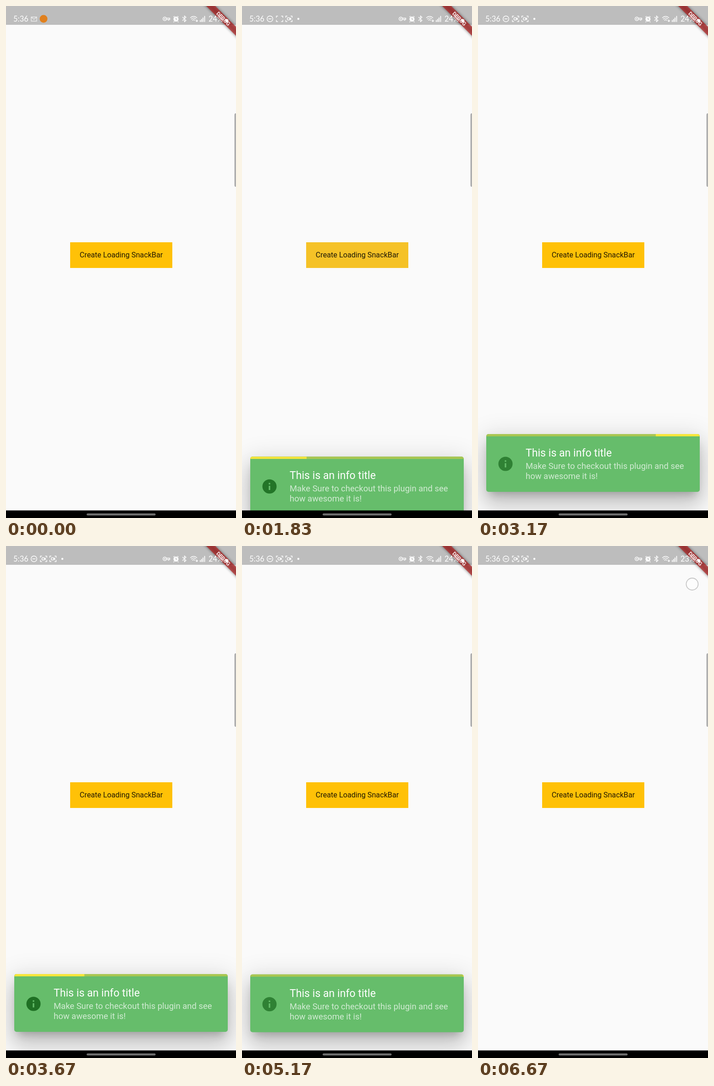
Animation, 502 px wide and 1116 px high, one loop 7.16 s. Source, as an HTML page:

```html
<!DOCTYPE html>
<html lang="en">
<head>
<meta charset="utf-8">
<title>Loading snackbar</title>
<style>
html, body { margin: 0; width: 100%; height: 100%; overflow: hidden; background: #fafafa; }
body { position: relative; font-family: Roboto, sans-serif; }
body > *, #bar > * { position: absolute; }
svg { left: 0; top: 0; }
#button { left: 140px; top: 515px; width: 223px; height: 55.5px; background: #ffc107; overflow: hidden; }
#button * { position: absolute; }
#label { left: 0; width: 100%; text-align: center; font-size: 16.2px; line-height: 56px; color: rgba(0,0,0,.87); }
#shade { inset: 0; background: #bcbcbc; }
#ripple { border-radius: 50%; background: #c8c8c8; transform: translate(-50%, -50%); left: 111px; top: 27px; }
#bar { left: 18px; top: 933px; width: 466px; height: 125.5px; border-radius: 5px; background: #66bd6b;
  box-shadow: 0 13px 17px -8px rgba(0,0,0,.2), 0 28px 44px 3px rgba(0,0,0,.14), 0 10px 53px 9px rgba(0,0,0,.12); }
#track { left: 0; top: 0; width: 466px; height: 4.6px; background: #a9c651; border-radius: 5px 5px 0 0; overflow: hidden; }
#track i { position: absolute; top: 0; height: 100%; background: #f7e63b; }
#title { left: 86px; top: 28px; font-size: 23.1px; line-height: 27px; color: #fff; white-space: nowrap; }
#message { left: 86px; top: 59px; font-size: 18.45px; line-height: 22px; color: rgba(255,255,255,.7); white-space: nowrap; }
</style>
</head>
<body>
<div id="button">
  <div id="shade"></div><div id="ripple"></div>
  <div id="label">Create Loading SnackBar</div>
</div>

<div id="bar">
  <div id="track"><i id="line1"></i><i id="line2"></i></div>
  <svg id="info" width="84" height="125">
    <path fill="#1f7024" fill-rule="evenodd" d="M26.5 65a15.5 15.5 0 1 0 31 0a15.5 15.5 0 1 0 -31 0M40.4 57.2h3.2v3.2h-3.2zM40.4 63.4h3.2v9.4h-3.2z"/>
  </svg>
  <div id="title">This is an info title</div>
  <div id="message">Make Sure to checkout this plugin and see<br>how awesome it is!</div>
</div>

<svg width="502" height="1116" fill="none" stroke-linecap="round" stroke-linejoin="round">
  <defs>
    <filter id="blur" x="-20%" y="-60%" width="140%" height="220%"><feGaussianBlur stdDeviation="3"/></filter>
    <path id="corners" d="M-7 -3V-6H-4M4 -6H7V-3M7 3V6H4M-4 6H-7V3"/>
    <g id="camera"><rect x="-3.5" y="-2.5" width="5" height="5" rx="1"/><path d="M1.5 0L4 -2V2Z"/></g>
  </defs>
  <path fill="#bdbdbd" d="M0 0H502V41H0Z"/>
  <path fill="#b0b0b0" d="M502 234h-1q-2.500 0 -2.500 4v152q0 4 2.500 4h1z"/>

  <g transform="translate(502 0) rotate(45)">
    <rect x="-60" y="32" width="120" height="14" fill="#000" opacity=".5" filter="url(#blur)"/>
    <rect x="-60" y="32" width="120" height="14" fill="#b71c1c" fill-opacity=".66"/>
    <text y="43.200" text-anchor="middle" font-size="11.800" font-weight="900" fill="#f3dede">DEBUG</text>
  </g>

  <g stroke="#fff" stroke-width="1.400">
    <g fill="#fff" stroke="none" font-family="Lato, 'Open Sans', sans-serif" font-size="16.500">
      <text x="16" y="34">5:36</text>
      <text id="battery" x="442" y="34">24%</text>
      <circle cx="482" cy="32" r="3.500"/>
    </g>
    <g id="early">
      <path d="M55 24H67V33H55ZM55 24L61 29L67 24" opacity=".7"/>
      <circle cx="82" cy="28" r="8.500" fill="#e0801e" stroke="none"/>
    </g>
    <g id="usual">
      <circle cx="61" cy="28" r="6.300"/><path d="M58 28H64"/>
      <use href="#corners" x="82" y="28"/><use id="blink" href="#camera" x="82" y="28"/>
      <use href="#corners" x="102.500" y="28"/><use href="#camera" x="102.500" y="28"/>
      <circle cx="123" cy="28" r="2.200" fill="#fff" stroke="none"/>
    </g>
    <circle cx="346.500" cy="28" r="3.800"/><path d="M350.500 26.500H357.500V29.500H351M355 30V31.500"/>
    <circle cx="346.500" cy="28" r=".8"/>
    <circle cx="371" cy="28.500" r="4.800" fill="#fff"/><path d="M366 23.500L367.500 22.500M376 23.500L374.500 22.500M367 34L366 35M375 34L376 35"/>
    <path d="M371 26V29H373" stroke="#bdbdbd"/>
    <path d="M385.500 24.500L393 31.500L389.500 34.500V21.500L393 24.500L385.500 31.500"/>
    <path d="M402.500 25.500Q409.500 19.500 416.500 25.500M404.500 28.500Q409.500 24 414 28M407 31Q409.500 29 412 31M416.500 30V34M414.500 32L416.500 34L418.500 32"/>
    <path d="M424 34V31.500M427 34V29M430 34V26M433.500 34V22.500" stroke-width="1.800"/>
  </g>

  <circle id="touch" r="13" stroke="#777" stroke-opacity=".4" stroke-width="1.800" fill="#fff" fill-opacity=".6"/>

  <path fill="#000" d="M0 1099.500H502V1116H0Z"/>
  <rect x="176" y="1106" width="150.500" height="4.500" rx="2.250" fill="#6e6e6e"/>
</svg>

<script>
const LOOP = 7160, DOWN = 1350, SHOW = 1600, HIDE = 5130, SLIDE = 500, TRAVEL = 178;
const $ = id => document.getElementById(id);
const clamp = x => Math.min(1, Math.max(0, x));
const show = (id, on) => $(id).style.visibility = on ? 'visible' : 'hidden';

// Timing curve from (0,0) to (1,1) with control points (a,b) and (c,d)
function bezier(a, b, c, d) {
  const at = (p, q, s) => 3 * p * s * (1 - s) ** 2 + 3 * q * s * s * (1 - s) + s ** 3;
  return x => {
    x = clamp(x);
    if (x === 0 || x === 1) return x;
    let lo = 0, hi = 1;
    for (let i = 0; i < 24; i++) {
      const mid = (lo + hi) / 2;
      if (at(a, c, mid) < x) lo = mid; else hi = mid;
    }
    return at(b, d, lo);
  };
}
const slide = bezier(.4, 0, .2, 1), ease = bezier(.25, .1, .25, 1), pulse = bezier(.42, 0, .58, 1);
const head1 = bezier(.2, 0, .8, 1), tail1 = bezier(.4, 0, 1, 1);
const head2 = bezier(0, 0, .65, 1), tail2 = bezier(.1, 0, .45, 1);

function segment(id, tail, head) {
  $(id).style.left = tail * 100 + '%';
  $(id).style.width = (head - tail) * 100 + '%';
}

function drawBar(t) {
  const age = t - SHOW, on = age > 0 && t < HIDE + SLIDE;
  $('bar').style.display = on ? 'block' : 'none';
  if (!on) return;
  const shown = t < HIDE ? slide(age / SLIDE) : slide(1 - (t - HIDE) / SLIDE);
  $('bar').style.transform = `translateY(${(1 - shown) * TRAVEL}px)`;
  const p = age % 1800;
  segment('line1', tail1((p - 333) / 750), head1(p / 750));
  segment('line2', tail2((p - 1267) / 533), head2((p - 1000) / 567));
  const beat = age / 1000 % 2;
  $('info').style.opacity = 1 - .6 * pulse(beat < 1 ? beat : 2 - beat);
}

function drawPress(t) {
  const held = t - DOWN, freed = t - SHOW;
  const fade = held < 0 ? 0 : 1 - clamp(freed / 300);
  const grow = freed < 0 ? ease(held / 1000) : Math.max(ease(.25), ease(.25 + freed / 225));
  $('shade').style.opacity = .4 * clamp(held / 200) * fade;
  $('ripple').style.opacity = .4 * clamp(held / 75) * fade;
  $('ripple').style.width = $('ripple').style.height = 2 * (38 + 77 * grow) + 'px';

  const last = t >= 6670;
  show('touch', last || held >= 0 && freed < 0);
  $('touch').setAttribute('transform', last ? 'translate(467.5 83)' : 'translate(251 541.5)');
}

function drawStatus(t) {
  const early = t < 200;
  show('early', early);
  show('usual', !early);
  const off = t >= 670 && t < 1170 || t >= 1830 && t < 6170 && (t - 1830) % 1000 < 340;
  show('blink', !early && !off);
  $('battery').textContent = t < 5670 ? '24%' : '23%';
}

function frame() {
  const t = performance.now() % LOOP;
  drawStatus(t);
  drawPress(t);
  drawBar(t);
  requestAnimationFrame(frame);
}
frame();
</script>
</body>
</html>
```
